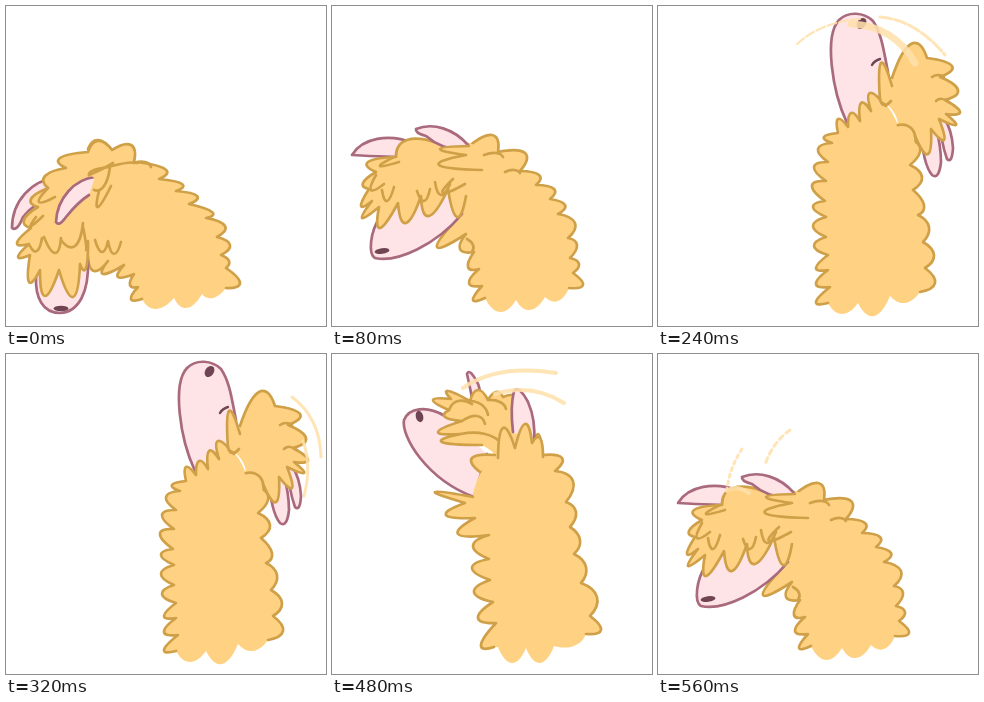
Write an HTML page with a canvas that moves like this. It is 320 px wide and 320 px high and loops after 0.64 s.

```html
<!DOCTYPE html>
<html lang="en">
<head>
<meta charset="utf-8">
<title>Head-banging alpaca</title>
<style>
html, body { margin: 0; width: 100%; height: 100%; overflow: hidden; background: #fff; }
canvas { display: block; width: 100vw; height: 100vh; }
</style>
</head>
<body>
<canvas id="stage" width="320" height="320"></canvas>
<script>
const ctx = document.getElementById('stage').getContext('2d');
const FUR = '#ffd283', FUR_LINE = '#cfa048', SKIN = '#ffe4e7', SKIN_LINE = '#a96a7e', NOSE = '#704553';
ctx.lineCap = ctx.lineJoin = 'round';

// Points alternate between notch and tuft tip; each tuft is one curve through its tip.
function lobes(text, start = 'M') {
  const n = text.replace('~', '').trim().split(/\s+/).map(Number);
  let d = `${start}${n[0]} ${n[1]}`;
  for (let i = 0; i + 5 < n.length; i += 4) {
    const handle = (k, side) => {
      const a = n[i + k], tip = n[i + 2 + k], b = n[i + 4 + k];
      return tip * 4 / 3 - (a + b) / 6 + side * (b - a) * .2;
    };
    d += `C${handle(0, -1)} ${handle(1, -1)} ${handle(0, 1)} ${handle(1, 1)} ${n[i + 4]} ${n[i + 5]}`;
  }
  return d;
}

function fill(d, color) {
  ctx.fillStyle = color;
  ctx.fill(new Path2D(d));
}

function line(d, color, width = 2.7) {
  ctx.strokeStyle = color;
  ctx.lineWidth = width;
  ctx.stroke(new Path2D(d));
}

function wisps(...edges) {
  edges.forEach(edge => line(lobes(edge), FUR_LINE));
}

// Edges that begin with ~ are filled but have no outline.
function fur(...edges) {
  fill(edges.map((edge, i) => lobes(edge, i ? 'L' : 'M')).join('') + 'Z', FUR);
  wisps(...edges.filter(edge => edge[0] !== '~'));
}

function skin(d) {
  fill(d, SKIN);
  line(d, SKIN_LINE);
}

function nose(x, y, rx, ry, turn = 0) {
  ctx.beginPath();
  ctx.ellipse(x, y, rx, ry, turn, 0, 7);
  ctx.fillStyle = NOSE;
  ctx.fill();
}

function trail(d, width = 3, dash = []) {
  ctx.setLineDash(dash);
  line(d, '#ffe0abdd', width);
  ctx.setLineDash([]);
}

function headDown() {
  fur('136 293 125 293 132 281 124 279 128 268 112 271 118 259 97 268 102 255 88 265 82 250',
    '~82 250 75 220 65 170',
    '82 143 92 134 106 144 125 139 128 156 159 163 153 173 176 178 170 185 191 190 183 198 206 206 200 212 219 220 211 231 224 239 215 249 223 255 220 262 234 277 220 282',
    '~220 282 207 292 196 288 181 302 168 292 150 303 136 293');
  skin('M30 270C29 292 37 307 54 307C73 306 83 286 82 255');
  nose(55, 302.5, 7.5, 2.8);
  skin('M50 172C26 174 6 195 6 222Q11 226 17 211Q27 198 45 192');
  fur('82 235 80 262 74 258 67 291 53 264 39 290 34 264 23 276 24 249 12 251 23 238 11 237 25 222 18 214 32 201 25 193 42 182 39 170 60 162 54 152 82 146 92 135 106 144',
    '~106 144 110 180 82 235');
  wisps('24 240 31 245 36 232', '38 231 49 247 55 232', '55 234 69 240 77 217', '77 221 80 238 80 244',
    '89 234 96 246 102 235 108 248 115 236', '30 211 25 220 37 210', '42 182 33 196 49 191');
  skin('M89 171C69 173 51 192 50 216Q53 221 60 211Q72 196 83 189');
  fur('83 169 88 164 104 161 98 180 88 184', '~88 184 90 175 83 169');
  wisps('83 169 96 163 107 157', '93 185 92 201 105 180', '106 160 121 157 131 157', '128 157 139 156 145 161');
}

function headForward() {
  skin('M78 151Q57 151 20 149C30 132 57 127 81 137');
  fur('153 292 141 294 150 280 137 277 147 263 136 261 142 246 128 243 134 228 105 241 126 212',
    '~126 212 125 175 136 141',
    '136 141 160 129 166 146 193 147 188 165 207 169 204 179 222 183 218 193 233 199 226 208 243 217 236 232 245 239 238 252 247 258 241 267 251 279 237 282',
    '~237 282 226 295 213 291 198 304 184 294 168 306 153 292');
  skin('M48 211C38 226 36 248 43 252C65 257 104 239 130 208L120 180L60 190');
  nose(50, 245, 7.5, 2.8, -.15);
  fur('134 190 125 211 116 183 97 210 89 190 74 217 66 197 48 222 47 201 30 212 40 195 29 200 37 183 31 177 44 166 36 156 64 151 75 134 105 137',
    '~105 137 148 145 134 190');
  wisps('44 169 39 184 52 178', '62 151 48 160 67 156', '50 184 55 195 62 181', '85 185 92 195 98 183', '103 176 109 189 118 178');
  skin('M136 139C122 123 101 116 84 123Q83 127 94 130Q109 143 130 144');
  fur('137 140 108 143 134 149 107 159 150 164', '~150 164 160 150 137 140');
  wisps('152 149 164 147 171 151', '121 173 111 187 133 178', '173 166 182 164 188 167', '135 233 141 239 140 246');
}

function headUp() {
  skin('M141 51Q140 42 135 20Q137 14 144 26Q149 34 148 45');
  skin('M113 62C94 51 77 54 72 66C69 82 94 125 142 143L155 100');
  nose(87.5, 62.5, 3.7, 5.8, -.25);
  fur('162 293 149 291 164 269 146 264 161 248 142 238 158 226 140 214 157 205 141 192 157 181 126 180 143 164 114 161 133 149 103 138 141 143',
    '~141 143 148 120 165 95',
    '200 100 206 80 211 101 230 104 223 117 241 127 234 148 244 158 238 173 248 186 242 200 254 213 249 229 265 243 258 262 269 276 254 280',
    '~254 280 242 292 222 292 208 309 194 294 180 309 166 293');
  fur('148 118 140 104 163 101', '~163 101 158 96 150 91',
    '150 91 110 88 129 80 106 78 130 67 113 63 117 56 101 46 119 45 116 37 138 47 146 36 156 46 164 38 171 43 184 42 182 54',
    '~182 54 190 75 170 100');
  wisps('117 56 126 47 140 50', '130 67 145 62 153 70', '129 80 153 80 170 90', '138 47 150 51 156 61', '156 46 168 48 174 55');
  skin('M181 78Q178 53 182 37Q187 31 196 48Q204 66 202 89');
  fur('166 104 171 74 183 94 193 70 200 89 208 84 211 103', '~211 103 190 115 166 104');
}

function headBack() {
  skin('M281 112Q283 136 289 153Q294 158 295 142Q294 124 286 112');
  skin('M263 125Q265 158 274 169Q281 174 283 156Q283 139 277 118');
  skin('M189 117C174 85 166 30 181 14C190 5 206 6 215 15C224 28 226 47 230 66L225 105');
  nose(203.5, 17.5, 4.3, 6, .6);
  line('M214 59Q216 55 222 53', NOSE, 2.4);
  fur('170 297 158 296 172 281 158 278 170 264 158 262 170 249 156 240 168 231 155 220 168 211 155 201 167 195 154 180 168 175 156 161 170 156 160 143 174 137 166 131 180 127 180 113 190 121 193 107 202 115 203 97 213 105 212 87 228 100',
    '~228 100 233 105 240 119',
    '240 119 252 121 258 136 262 146 252 159 264 171 255 184 266 199 260 209 271 221 265 236 276 249 267 262 277 277 262 286',
    '~262 286 247 297 232 290 216 310 200 297 184 308 170 297');
  fur('222 94 223 57 234 80', '234 72 253 38 269 52 294 60 282 71 300 84 287 94 302 106 288 108 298 119 281 113 286 134 273 123 270 148 258 132',
    '~258 132 246 120 240 119', '~240 119 235 105 222 94');
  wisps('240 119 253 122 258 136', '222 93 226 99 233 95', '274 71 280 69 286 71', '278 95 284 93 291 96');
}

const beats = [
  [headDown],
  [headForward],
  [headUp, () => {
    trail('M39 91Q61 63 105 45', 3.2);
    trail('M82 68Q103 57 143 61', 4);
  }],
  [headBack, () => {
    trail('M139 38Q163 16 202 13', 2.2, [9, 3]);
    trail('M193 18Q236 20 257 57', 7);
    trail('M222 11Q258 14 287 49', 3, [12, 3]);
  }],
  [headBack, () => {
    trail('M286 43Q314 64 315 103', 3);
    trail('M297 87Q306 112 298 142', 3);
  }],
  [headBack, () => {
    trail('M272 108Q270 128 277 144', 5);
    trail('M295 127Q300 152 288 178', 4, [2, 4]);
  }],
  [headUp, () => {
    trail('M131 34Q165 10 224 19', 4);
    trail('M163 40Q200 29 232 49', 4);
  }],
  [headForward, () => {
    trail('M84 95Q72 113 69 135', 3, [3, 4]);
    trail('M132 76Q114 89 107 111', 3, [5, 4]);
    trail('M69 137Q78 130 91 139', 4);
  }]
];

function draw(now) {
  const [pose, trails] = beats[Math.floor(now / 80) % beats.length];
  ctx.clearRect(0, 0, 320, 320);
  pose();
  trails?.();
  requestAnimationFrame(draw);
}
draw(performance.now());
</script>
</body>
</html>
```
